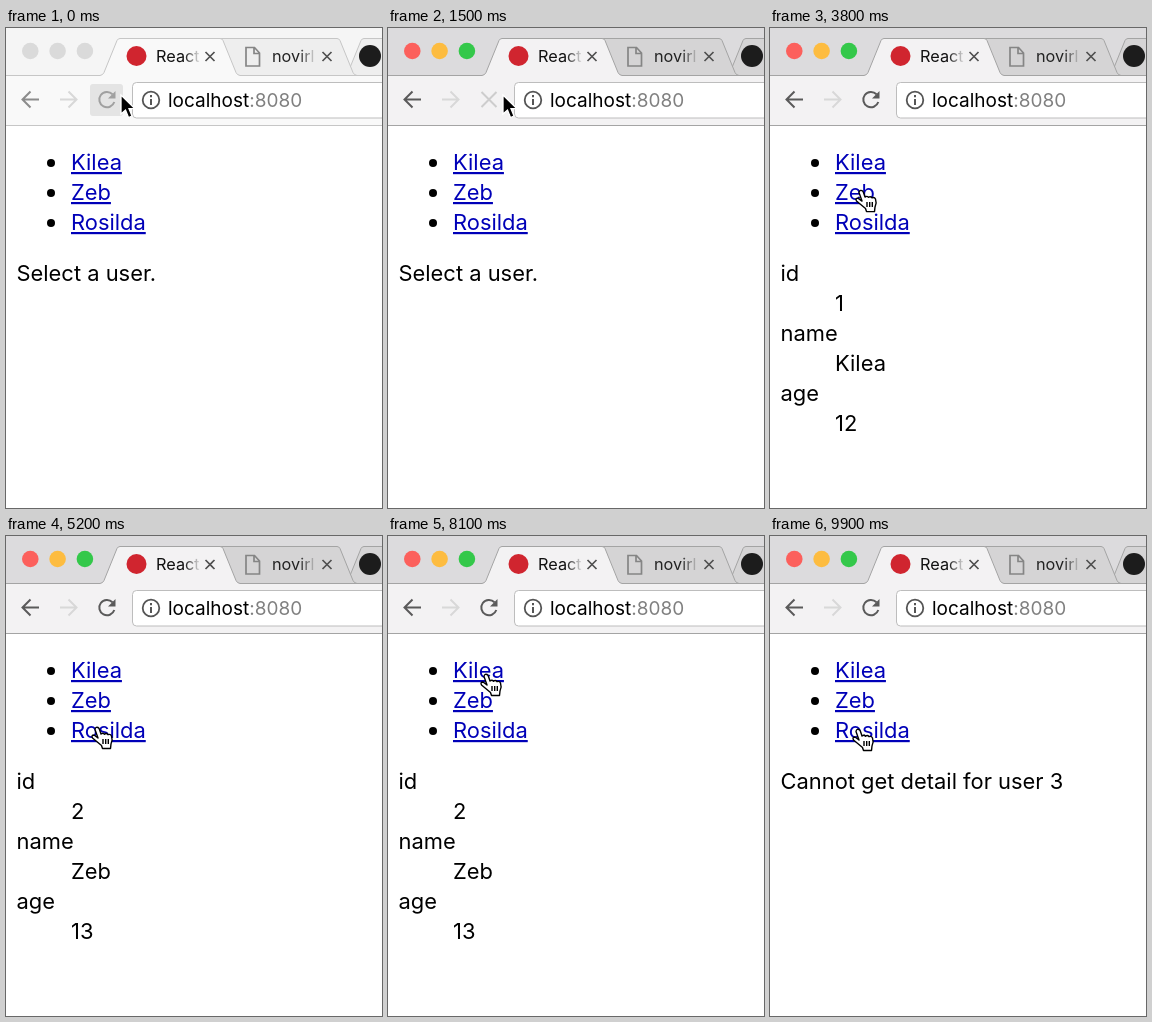
Animation of 376 by 480 pixels, one loop 10 s. Source, as an HTML page:

```html
<!DOCTYPE html>
<html lang="en">
<head>
<meta charset="utf-8">
<title>User list</title>
<style>
  html, body { margin: 0; width: 100%; height: 100%; overflow: hidden; background: #fff; }
  svg { display: block; width: 376px; height: 480px; font-family: Inter, "Open Sans", sans-serif; }
  .line { fill: none; }
  #page { font-size: 21.9px; }
  .link { fill: #0000b8; text-decoration: underline 1.3px #00007c; text-underline-offset: 2px; }
</style>
</head>
<body>
<svg viewBox="0 0 376 480">
  <defs>
    <linearGradient id="fadeA" gradientUnits="userSpaceOnUse" x1="178" x2="195">
      <stop stop-color="#111"/><stop offset="1" stop-color="#111" stop-opacity="0"/>
    </linearGradient>
    <linearGradient id="fadeB" gradientUnits="userSpaceOnUse" x1="293" x2="311">
      <stop stop-color="#222"/><stop offset="1" stop-color="#222" stop-opacity="0"/>
    </linearGradient>
  </defs>

  <rect id="strip" width="376" height="48"/>
  <g id="tabs" stroke="#a9a9a9">
    <path id="tabC" d="M338 47.500Q341 47 342 44.500L355 12.500Q356 10.500 358 10.500H390V47.500"/>
    <path id="tabB" d="M214 47.500V10.500H331Q333 10.500 334 12.500L347 44.500Q348 47 351 47.500"/>
    <path id="bar" d="M-2 47.500H94Q97 47 98 44.500L111 12.500Q112 10.500 114 10.500H214Q216 10.500 217 12.500L230 44.500Q231 47 234 47.500H380V97.500H-2Z"/>
  </g>
  <g id="lights"></g>
  <circle cx="130.500" cy="28" r="10" fill="#d0252f"/>
  <circle cx="364" cy="28" r="11" fill="#1c1c1c"/>
  <g font-size="16.300">
    <text x="150" y="34" fill="url(#fadeA)">React</text>
    <text x="266" y="34" fill="url(#fadeB)">novirl</text>
  </g>
  <path class="line" stroke="#505050" stroke-width="1.700" d="M199.500 24l9 9m0-9l-9 9M316.500 24l9 9m0-9l-9 9"/>
  <path class="line" stroke="#858585" stroke-width="1.700" d="M240 19.500H248.500L253.500 25V38H240ZM248 19.500V25.500H253.500"/>

  <path id="back" class="line" stroke-width="2" d="M33 71.500H17M24.500 63.500L16.500 71.500L24.500 79.500"/>
  <path class="line" stroke="#d8d8d8" stroke-width="2" d="M54 71.500H70M62.500 63.500L70.500 71.500L62.500 79.500"/>
  <rect id="hover" x="84" y="56" width="33" height="32" rx="3" fill="#e4e4e4"/>
  <g id="reload">
    <path class="line" stroke="currentColor" stroke-width="2" d="M106.500 66.200A7.700 7.700 0 1 0 108.300 74"/>
    <path fill="currentColor" d="M109.500 63V70.500H102Z"/>
  </g>
  <path id="stop" class="line" stroke="#cdcdcd" stroke-width="2" d="M93.500 64l15 15m0-15l-15 15"/>
  <rect x="126.500" y="54.500" width="270" height="35.500" rx="4" fill="#fff" stroke="#bdbdbd"/>
  <circle class="line" cx="145" cy="72" r="8.300" stroke="#555" stroke-width="1.800"/>
  <path class="line" stroke="#555" stroke-width="2" d="M145 67v2.200M145 71v6"/>
  <text x="162" y="79" font-size="19">localhost<tspan fill="#808080">:8080</tspan></text>

  <g id="page"></g>
  <path id="arrow" fill="#000" stroke="#fff" stroke-width="1.300" d="M0 0V19L4.500 15L7.500 22.500L11 21L8 13.700H14Z"/>
  <g id="hand" stroke="#000" stroke-width="1.400" stroke-linejoin="round">
    <path fill="#fff" d="M-2 2.500Q-1.500 -.5 1 .5Q2 1 2.500 2.500L4 7Q6 5.500 7.500 7.200Q9.500 5.700 11 7.700Q13.500 6.700 14.500 9Q16 13 14 17L13.500 21.500H5.500L4.500 18.500L-4.500 11Q-6 8 -3 8L1 11Z"/>
    <path fill="none" d="M6 12V17M8.700 12V17M11.300 12V17"/>
  </g>
</svg>
<script>
const $ = id => document.getElementById(id);
const set = (id, attrs) => Object.entries(attrs).forEach(([k, v]) => $(id).setAttribute(k, v));
const show = (id, on) => set(id, { visibility: on ? "visible" : "hidden" });
const text = (x, y, s, cls = "") => `<text x="${x}" y="${y}" class="${cls}">${s}</text>`;

const LOOP = 10000;
const names = ["Kilea", "Zeb", "Rosilda"];
const ages = [12, 13];

const list = names.map((name, i) =>
  `<circle cx="45" cy="${135 + 30 * i}" r="4"/>` + text(65, 142 + 30 * i, name, "link")).join("");
const note = s => list + text(10.5, 253.3, s);
const detail = i => list + ["id", i + 1, "name", names[i], "age", ages[i]]
  .map((s, row) => text(row % 2 ? 65 : 10.5, 253.3 + 30 * row, s)).join("");

const prompt = "Select a user.", wait = "Waiting...", failed = "Cannot get detail for user 3";
const pages = [
  [0, note(prompt)],
  [400, text(10.5, 131.5, "Fetching user list...") + text(10.5, 161.5, prompt)],
  [1500, note(prompt)],
  [2300, note(wait)],
  [3300, detail(0)],
  [4000, note(wait)],
  [5000, detail(1)],
  [5500, note(wait)],
  [6500, note(failed)],
  [7100, detail(1)],
  [8400, detail(0)],
  [9700, note(failed)]
];

// Pointer stops: time, x, y
const stops = [
  [0, 115, 67], [1500, 115, 67], [2100, 91, 128], [3500, 91, 128], [3850, 91, 164],
  [4800, 91, 164], [5150, 91, 191], [6400, 91, 191], [6750, 91, 169],
  [7700, 91, 169], [8050, 98, 138], [9100, 98, 138], [9500, 88, 193], [LOOP, 88, 193]
];

function pointer(t) {
  const i = stops.findIndex(s => s[0] > t);
  const [t0, x0, y0] = stops[i - 1], [t1, x1, y1] = stops[i];
  const p = (t - t0) / (t1 - t0), e = p * p * (3 - 2 * p);
  return [x0 + (x1 - x0) * e, y0 + (y1 - y0) * e];
}

let current;
function draw(t) {
  const focused = t >= 100, loading = t >= 400 && t < 1600;
  const colors = focused ? ["#fc605c", "#fdbc40", "#34c84a"] : Array(3).fill("#dadada");
  $("lights").innerHTML = colors.map((c, i) =>
    `<circle cx="${24.3 + 27.3 * i}" cy="23" r="8.300" fill="${c}"/>`).join("");
  set("strip", { fill: focused ? "#dcdbdd" : "#f5f5f5" });
  set("tabs", { stroke: focused ? "#a4a4a4" : "#c6c6c6" });
  set("bar", { fill: focused ? "#f3f2f3" : "#f9f9f9" });
  for (const id of ["tabB", "tabC"]) set(id, { fill: focused ? "#d5d4d5" : "#eeeeee" });
  set("back", { stroke: focused ? "#5a5a5a" : "#8c8c8c" });
  set("reload", { color: focused ? "#5a5a5a" : "#a0a0a0" });
  show("hover", t < 400);
  show("reload", !loading);
  show("stop", loading);

  const page = pages.findLast(p => p[0] <= t)[1];
  if (page !== current) $("page").innerHTML = current = page;

  const [x, y] = pointer(t);
  const overLink = x > 65 && x < 115 && y > 123 && y < 213 && (y - 123) % 30 < 26;
  for (const id of ["arrow", "hand"]) set(id, { transform: `translate(${x} ${y})` });
  show("arrow", !overLink);
  show("hand", overLink);
}

const start = performance.now();
function tick() {
  draw((performance.now() - start) % LOOP);
  requestAnimationFrame(tick);
}
tick();
</script>
</body>
</html>
```
